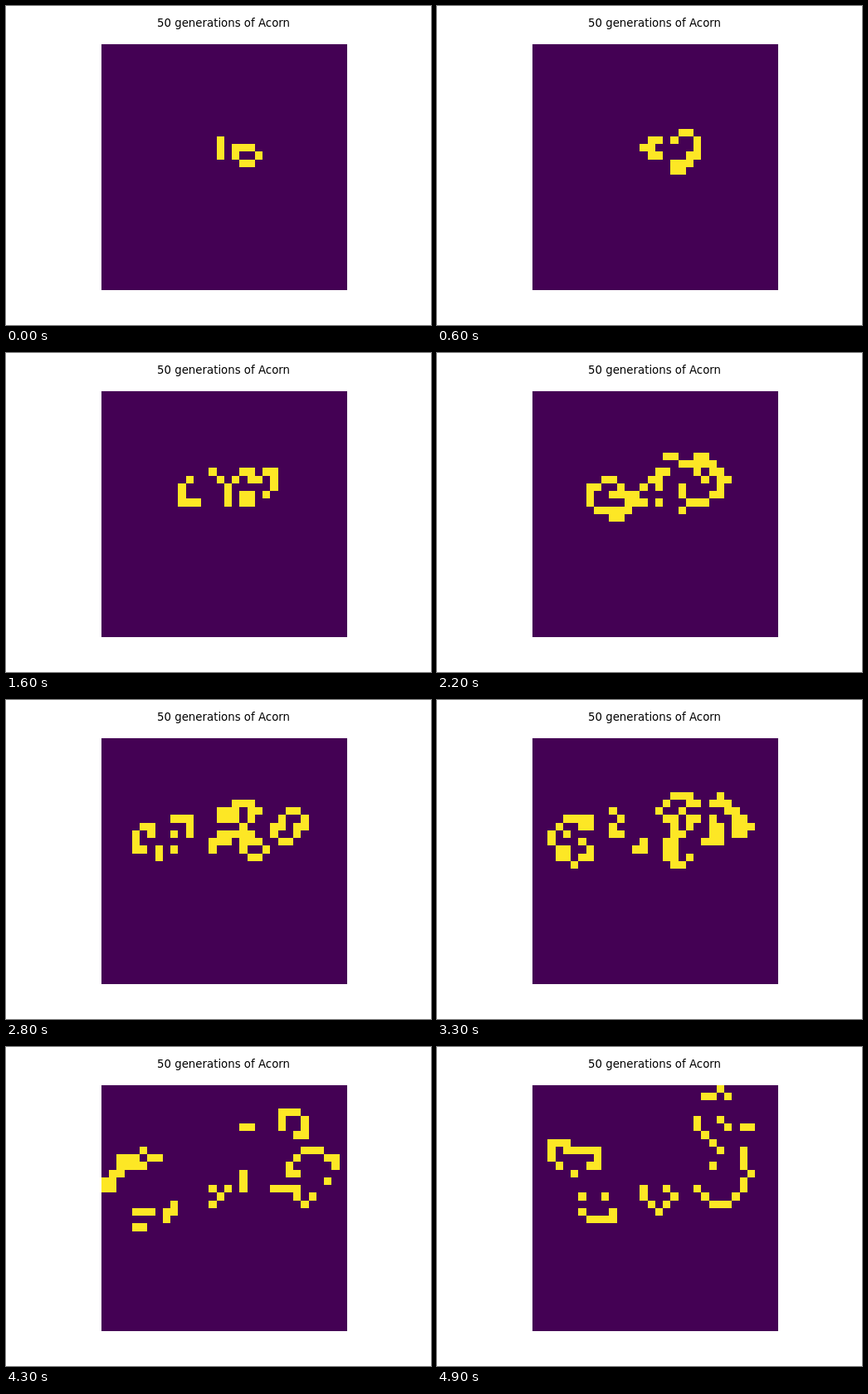
Recreate the animation shown at these times as an HTML page with a canvas. Size 512 by 384 pixels, loop 5000 ms.

```html
<!DOCTYPE html>
<html lang="en">
<head>
<meta charset="utf-8">
<title>50 generations of Acorn</title>
<style>
  html, body { margin: 0; width: 100%; height: 100%; overflow: hidden; background: #fff; }
  canvas { display: block; }
</style>
</head>
<body>
<canvas id="stage" width="512" height="384"></canvas>
<script>
const ctx = document.getElementById('stage').getContext('2d');
const SIZE = 32, CELL = 9.25, LEFT = 115, TOP = 46;
const STEP = 100, COUNT = 50, FIRST = 2;
const ACORN = ['.x.....', '...x...', 'xx..xxx'];

const alive = (grid, r, c) => grid[r]?.[c] ? 1 : 0;

// Cells beyond the border count as dead.
function evolve(grid) {
  return grid.map((row, r) => row.map((cell, c) => {
    let n = -cell;
    for (let y = r - 1; y <= r + 1; y++)
      for (let x = c - 1; x <= c + 1; x++) n += alive(grid, y, x);
    return n === 3 || (cell && n === 2) ? 1 : 0;
  }));
}

function seed() {
  const grid = Array.from({ length: SIZE }, () => Array(SIZE).fill(0));
  ACORN.forEach((line, r) => [...line].forEach((ch, c) => {
    if (ch === 'x') grid[12 + r][14 + c] = 1;
  }));
  return grid;
}

let grid = seed();
for (let i = 0; i < FIRST; i++) grid = evolve(grid);
const generations = [grid];
while (generations.length < COUNT) generations.push(grid = evolve(grid));

// Cell edges sit on whole pixels, with halves rounded down.
const edge = (start, i) => Math.ceil(start + i * CELL - 0.5);

function draw(cells) {
  ctx.fillStyle = '#fff';
  ctx.fillRect(0, 0, 512, 384);
  ctx.fillStyle = '#000';
  ctx.font = '13.333px "DejaVu Sans", sans-serif';
  ctx.fillText('50 generations of Acorn', 182, 25);
  ctx.fillStyle = '#440154';
  ctx.fillRect(LEFT, TOP, SIZE * CELL, SIZE * CELL);
  ctx.fillStyle = '#fde725';
  cells.forEach((row, r) => row.forEach((cell, c) => {
    if (!cell) return;
    const x = edge(LEFT, c), y = edge(TOP, r);
    ctx.fillRect(x, y, edge(LEFT, c + 1) - x, edge(TOP, r + 1) - y);
  }));
}

let start, shown = -1;
function tick(now) {
  start ??= now;
  const index = Math.floor((now - start) / STEP) % COUNT;
  if (index !== shown) draw(generations[shown = index]);
  requestAnimationFrame(tick);
}
draw(generations[0]);
requestAnimationFrame(tick);
</script>
</body>
</html>
```
